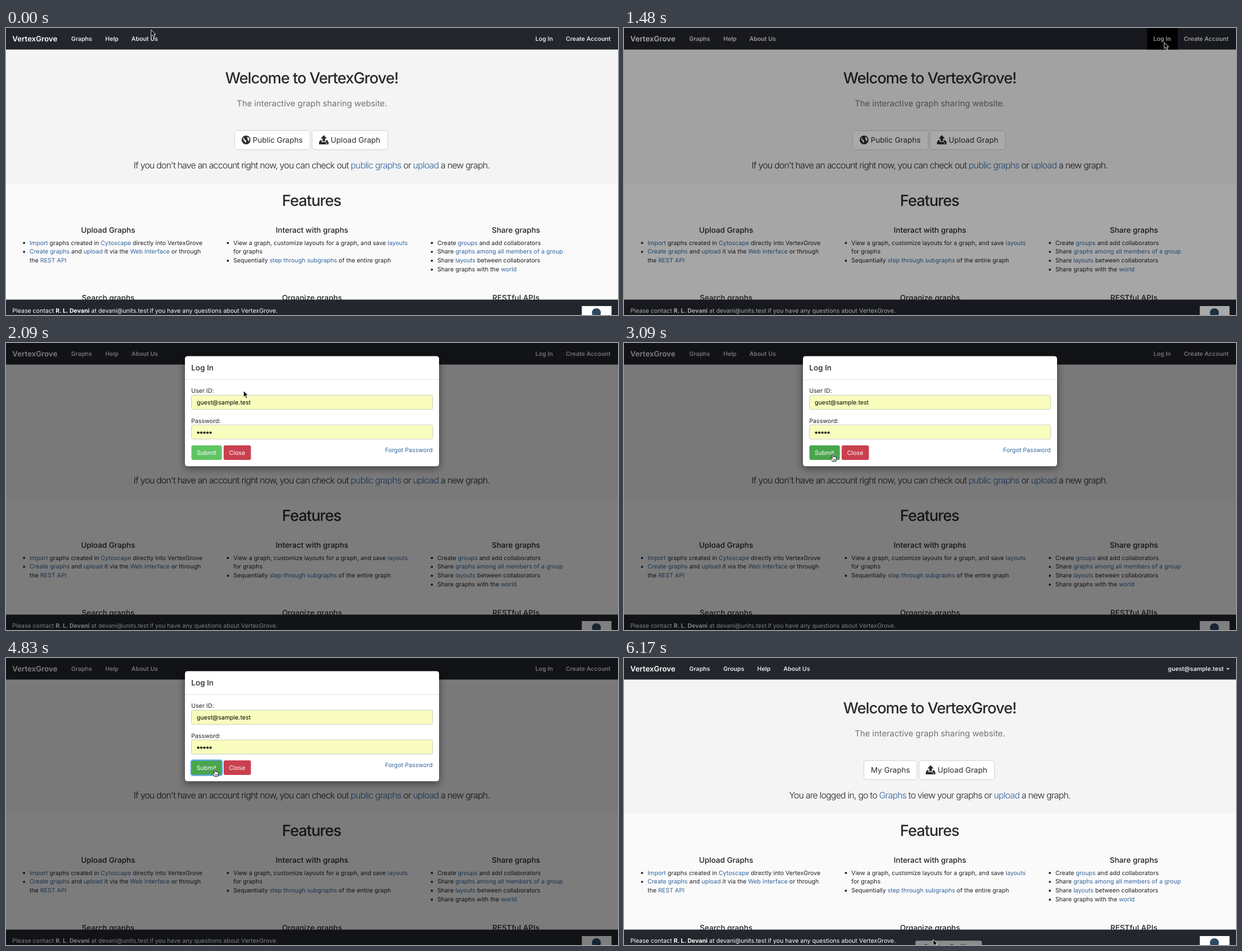
Write an HTML page that moves like this. It is 1091x513 px and loops after 6.21 s.

```html
<!DOCTYPE html>
<html lang="en">
<head>
<meta charset="utf-8">
<title>Log in</title>
<style>
html, body { margin: 0; width: 100%; height: 100%; overflow: hidden; background: #fafafa; }
svg { display: block; width: 1091px; height: 513px; cursor: default; }
text { font-family: Inter, Roboto, "Open Sans", sans-serif; font-size: 10.6px; letter-spacing: .025px; fill: #222226; white-space: pre; text-rendering: geometricPrecision; }
.link { fill: #30659f; }
.nav { font-weight: 600; letter-spacing: 0; fill: #e8e8e8; }
.brand { font-weight: 600; font-size: 13.3px; letter-spacing: 0; fill: #fff; }
.h1 { font-weight: 500; font-size: 27.3px; letter-spacing: -1.03px; fill: #2a2a2d; }
.h4 { font-weight: 500; font-size: 13.55px; letter-spacing: 0; }
.sub { font-size: 14.75px; fill: #717171; }
.btn { font-size: 13.5px; letter-spacing: 0; fill: #2c2c2f; }
.lead { font-weight: 300; font-size: 15.9px; letter-spacing: -.78px; }
.foot { fill: #fff; }
.bold { font-weight: 700; }
.white { fill: #fff; }
#modal { filter: drop-shadow(0 4px 7px rgba(0, 0, 0, .5)); }
</style>
</head>
<body>
<svg id="stage" viewBox="0 0 1091 513" xmlns="http://www.w3.org/2000/svg">
  <g id="page"></g>
  <g id="guest"></g>
  <g id="member"></g>
  <rect id="backdrop" width="1091" height="513"/>
  <g id="modal"></g>
  <g id="tip"></g>
  <path id="arrow" d="M0 0V11.2L2.7 8.7L4.6 13L6.6 12.1L4.8 8H8.3Z" fill="#000" stroke="#fff" stroke-width=".9" stroke-linejoin="round"/>
  <g id="hand" fill="#fff" stroke="#000" stroke-width=".9" stroke-linejoin="round" stroke-linecap="round">
    <path d="M-1 1.2C-1-.3 1.2-.3 1.2 1.2V5.2C1.5 4.2 3.2 4.4 3.2 5.5C3.6 4.7 5.1 5 5.1 6.1C5.6 5.4 6.8 5.8 6.8 6.9V9.5C6.8 11.3 5.7 11.8 5.7 13.6H-.5C-.7 11.8-2.2 10.6-3.5 8.6C-4.2 7.4-3 6.5-2 7.4L-1 8.4Z"/>
    <path d="M1.2 9.3V11.7M3 9.3V11.7M4.8 9.3V11.7" fill="none" stroke-width=".7"/>
  </g>
</svg>
<script>
const LOOP = 6210;
const SITE = "VertexGrove";
const USER = "guest@sample.test";
const BAR = "#23262d";
const $ = id => document.getElementById(id);

function el(parent, tag, attrs) {
  const node = document.createElementNS("http://www.w3.org/2000/svg", tag);
  for (const k in attrs) node.setAttribute(k, attrs[k]);
  parent.appendChild(node);
  return node;
}

function rect(g, x, y, width, height, fill, more) {
  return el(g, "rect", { x, y, width, height, fill, ...more });
}

// Text in [brackets] becomes a link, text in {braces} is bold.
function text(g, x, y, str, cls = "", anchor = "start") {
  const node = el(g, "text", { x, y, class: cls, "text-anchor": anchor });
  for (const part of str.split(/(\[.*?\]|\{.*?\})/).filter(Boolean)) {
    const kind = { "[": "link", "{": "bold" }[part[0]];
    el(node, "tspan", kind ? { class: kind } : {}).textContent = kind ? part.slice(1, -1) : part;
  }
  return node;
}

const mid = (g, x, y, str, cls) => text(g, x, y, str, cls, "middle");

function button(g, x, width, label, labelX) {
  rect(g, x, 183.3, width, 34.2, "#fff", { rx: 4.5, stroke: "#cbcbcb", "stroke-width": .9 });
  text(g, labelX, 205.1, label, "btn");
}

function globe(g, x, y) {
  const icon = el(g, "g", { transform: `translate(${x} ${y})` });
  el(icon, "circle", { r: 7.9, fill: "#2c2c2f" });
  el(icon, "path", { fill: "#fff", d: "M-5.6-2.2L-4.2-4.4L-3-3.4L-3.8-1.6L-2.2-.6L-.2.8L.4 2.2L-1.4 5.4L-2.2 3L-4 .6ZM1.6-5.6L4.6-4.4L6-1.6L5.6 1.2L4.4 2.4L3.8.2L2.2-1L2.6-2.8Z" });
}

function uploadIcon(g, x) {
  el(g, "path", { fill: "#2c2c2f", transform: `translate(${x} 191.6)`,
    d: "M8.5 0L14 6H10.8V10.8H6.2V6H3ZM2.2 9H4.7V12.2H12.3V9H14.8L17 12.6V16.4H0V12.6ZM12.2 13.6V15H14.6V13.6Z", "fill-rule": "evenodd" });
}

function buildPage(g) {
  rect(g, 0, 0, 1091, 513, "#fafafa");
  rect(g, 0, 0, 1091, 278, "#f4f4f4");
  rect(g, 0, 0, 1091, 38.5, BAR);
  mid(g, 545, 99, `Welcome to ${SITE}!`, "h1");
  mid(g, 545.5, 140, "The interactive graph sharing website.", "sub");
  mid(g, 544.7, 318, "Features", "h1");

  const columns = [
    { x: 42, mid: 182, title: "Upload Graphs", next: "Search graphs", lines: [
      `•[Import] graphs created in [Cytoscape] directly into ${SITE}`,
      "•[Create graphs] and [upload] it via the [Web Interface] or through",
      "the [REST API]"] },
    { x: 405.3, mid: 545.5, title: "Interact with graphs", next: "Organize graphs", lines: [
      "•View a graph, customize layouts for a graph, and save [layouts]",
      "for graphs",
      "•Sequentially [step through subgraphs] of the entire graph"] },
    { x: 769, mid: 909, title: "Share graphs", next: "RESTful APIs", lines: [
      "•Create [groups] and add collaborators",
      "•Share [graphs among all members of a group]",
      "•Share [layouts] between collaborators",
      "•Share graphs with the [world]"] }
  ];
  for (const c of columns) {
    mid(g, c.mid, 365.6, c.title, "h4");
    mid(g, c.mid, 487.3, c.next, "h4");
    c.lines.forEach((line, i) => {
      const y = 387.5 + i * 15.9;
      if (line[0] === "•") el(g, "circle", { cx: c.x - 9.8, cy: y - 3.3, r: 1.9, fill: "#222226" });
      text(g, c.x, y, line.replace("•", ""));
    });
  }

  rect(g, 0, 485.5, 1091, 27.5, BAR);
  text(g, 11.3, 509.2, "Please contact {R. L. Devani} at devani@units.test", "foot");
  text(g, 256.3, 509.2, `if you have any questions about ${SITE}.`, "foot");
  rect(g, 1026.5, 497, 53, 16, "#fff");
  el(g, "circle", { cx: 1052.5, cy: 509, r: 8, fill: "#2b4a66" });
}

function buildNav(g, items) {
  text(g, 11.3, 23.6, SITE, "brand");
  for (const [x, label] of items) text(g, x, 22.8, label, "nav");
}

function buildGuest(g) {
  const hover = rect(g, 932.6, 0, 54.5, 38.5, "#000");
  buildNav(g, [[116.3, "Graphs"], [177, "Help"], [223.6, "About Us"], [943.8, "Log In"], [998, "Create Account"]]);
  button(g, 407.7, 134.6, "Public Graphs", 439.8);
  globe(g, 428, 200.2);
  button(g, 545.6, 134.6, "Upload Graph", 578.8);
  uploadIcon(g, 558);
  mid(g, 544.8, 250.6, "If you don't have an account right now, you can check out [public graphs] or [upload] a new graph.", "lead");
  return hover;
}

function buildMember(g) {
  buildNav(g, [[116.3, "Graphs"], [177, "Groups"], [237.6, "Help"], [284.2, "About Us"]]);
  text(g, 1069, 22.8, USER, "nav", "end");
  el(g, "path", { d: "M1073.6 18.2H1079.6L1076.6 21.2Z", fill: "#e8e8e8" });
  button(g, 427.6, 94.8, "My Graphs", 440);
  button(g, 526, 134.6, "Upload Graph", 559);
  uploadIcon(g, 538);
  mid(g, 545, 250.6, "You are logged in, go to [Graphs] to view your graphs or [upload] a new graph.", "lead");
}

function buildModal(g) {
  rect(g, 319, 23.5, 453, 196.7, "#fff", { rx: 4.5 });
  text(g, 330.3, 49.2, "Log In", "h4");
  rect(g, 319, 65, 453, .9, "#e3e3e3");
  for (const [y, label] of [[93.3, "User ID:"], [146.4, "Password:"]]) {
    text(g, 330.3, y - 3.9, label);
    rect(g, 330.6, y, 430, 25.4, "#f8fdbe", { rx: 3, stroke: "#c8c8b4", "stroke-width": .9 });
  }
  text(g, 340, 110.2, USER).style.fill = "#000";
  for (let i = 0; i < 5; i++) el(g, "circle", { cx: 342.8 + i * 5.45, cy: 160.2, r: 2.05, fill: "#000" });
  const submit = rect(g, 330.5, 183, 54.2, 26, "#5fc463", { rx: 3 });
  const ring = rect(g, 329.9, 182.7, 55.4, 27, "none", { rx: 3.5, stroke: "#59a5e0", "stroke-width": 2.2 });
  rect(g, 388, 183, 48.6, 26, "#ca404e", { rx: 3 });
  text(g, 340, 199.8, "Submit", "white");
  text(g, 397.8, 199.8, "Close", "white");
  text(g, 760.5, 195.2, "[Forgot Password]", "", "end");
  return { ring, submit };
}

function buildTip(g) {
  rect(g, 519.5, 505.2, 118.5, 20, "#8c8c8e", { rx: 3 });
  mid(g, 578.5, 519.6, "Session Profiles").style.fontSize = "11.5px";
}

buildPage($("page"));
const navHover = buildGuest($("guest"));
buildMember($("member"));
const { ring, submit } = buildModal($("modal"));
buildTip($("tip"));

// Pointer stops: time, x, y
const path = [
  [0, 258.6, 3.4], [120, 258.6, 3.4], [1000, 963, 25.8], [1580, 963, 25.8],
  [2000, 423.4, 85.6], [2200, 423.4, 85.6], [3050, 372, 198.3],
  [5650, 372, 198.3], [6160, 551, 503], [LOOP, 551, 503]
];
const clamp = v => Math.min(1, Math.max(0, v));
const span = (t, from, length) => clamp((t - from) / length);
const smooth = p => p * p * (3 - 2 * p);

function pointerAt(t) {
  const i = path.findIndex(k => k[0] > t);
  const [t0, x0, y0] = path[i - 1], [t1, x1, y1] = path[i];
  const p = smooth((t - t0) / (t1 - t0));
  return [x0 + (x1 - x0) * p, y0 + (y1 - y0) * p];
}

const show = (node, on) => node.setAttribute("visibility", on ? "visible" : "hidden");

function draw(t) {
  const loggedIn = t >= 4850;
  const [x, y] = pointerAt(t);
  const onSubmit = x > 330 && x < 385 && y > 183 && y < 209;
  const hand = onSubmit && t > 2200 && t <= 5650;

  show($("guest"), !loggedIn);
  show($("member"), loggedIn);
  show(navHover, !loggedIn && t < 1700 && x > 933 && x < 987 && y < 38);

  $("backdrop").setAttribute("opacity", loggedIn ? 0 : .5 * span(t, 1380, 150));
  const slide = 1 - Math.pow(1 - span(t, 1540, 300), 2);
  $("modal").setAttribute("opacity", loggedIn ? 0 : span(t, 1540, 150));
  $("modal").setAttribute("transform", `translate(0 ${-49 * (1 - slide)})`);
  submit.setAttribute("fill", onSubmit ? "#49a54d" : "#5fc463");
  show(ring, !loggedIn && t >= 4120);

  show($("tip"), t >= 6120);
  show($("arrow"), !hand);
  show($("hand"), hand);
  for (const id of ["arrow", "hand"]) $(id).setAttribute("transform", `translate(${x} ${y})`);
}

const start = performance.now();
function tick() {
  draw((performance.now() - start) % LOOP);
  requestAnimationFrame(tick);
}
tick();
</script>
</body>
</html>
```
